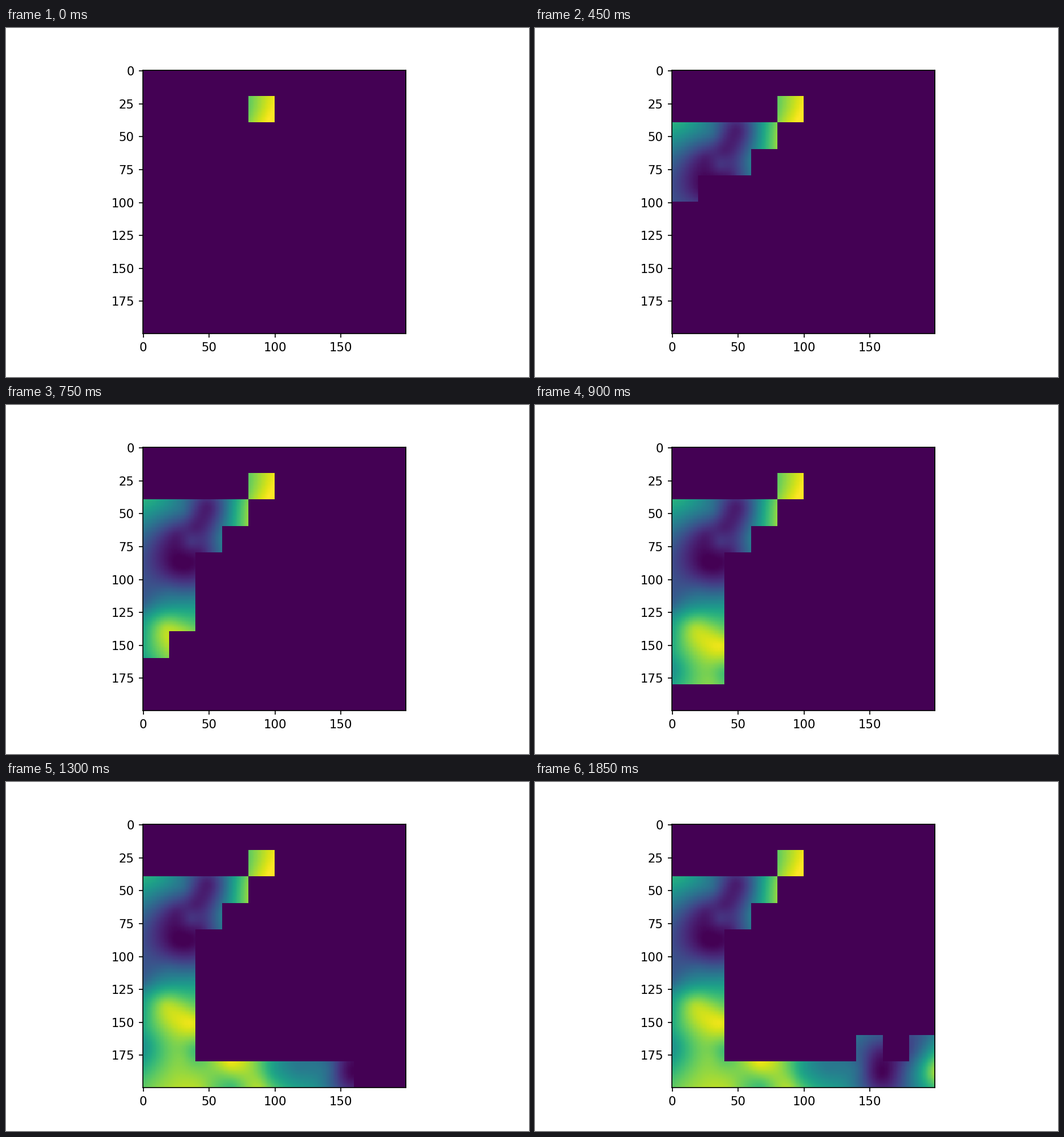
These frames come from a looping animation (917 by 611 pixels, 2 s). A matplotlib script:

```python
import numpy as np
import matplotlib.pyplot as plt
from matplotlib.animation import FuncAnimation

W, H, DPI = 917, 611, 128
SCALE = 152.8 / DPI
SIZE, TILE = 200, 20
FRAMES, INTERVAL = 40, 50

plt.rcParams.update({
    "font.family": "DejaVu Sans",
    "font.size": 10 * SCALE,
    "axes.linewidth": 0.8 * SCALE,
})

# Key points of the landscape, grouped by height.
LEVELS = {
    0.01: [(25, 91), (38, 89), (159, 190)],
    0.08: [(49, 45), (40, 61), (25, 67), (43, 79), (157, 174)],
    0.15: [(37, 72), (24, 101), (40, 101), (172, 186), (149, 190)],
    0.25: [(0, 80), (0, 100), (59, 46), (183, 172), (159, 162)],
    0.33: [(10, 60), (31, 49), (20, 110), (0, 120), (142, 165), (141, 186)],
    0.42: [(60, 70), (27, 42), (117, 186), (129, 188), (198, 162), (183, 190)],
    0.50: [(20, 120), (40, 119), (0, 129), (0, 169), (67, 46), (110, 190),
           (130, 199)],
    0.59: [(0, 143), (0, 156), (8, 42), (99, 189)],
    0.70: [(0, 193), (10, 182), (30, 130), (40, 172), (68, 199), (199, 199)],
    0.80: [(79, 44), (78, 58), (84, 22), (30, 177), (59, 190), (40, 140)],
    0.87: [(17, 137), (22, 156), (43, 199), (88, 199), (200, 189), (88, 30)],
    0.97: [(37, 151), (66, 181), (92, 39), (99, 21)],
}


def kernel(a, b):
    d2 = ((a[:, None] - b) ** 2).sum(axis=2)
    return d2 * np.log(d2 + 1e-12)


def with_plane(p):
    return np.column_stack([np.ones(len(p)), p])


def terrain(levels):
    """Thin-plate surface through the key points."""
    pts = np.array([p for group in levels.values() for p in group]) / SIZE
    z = [h for h, group in levels.items() for _ in group]
    plane = with_plane(pts)
    system = np.block([[kernel(pts, pts), plane],
                       [plane.T, np.zeros((3, 3))]])
    weights = np.linalg.solve(system, np.append(z, np.zeros(3)))
    y, x = (np.mgrid[:SIZE, :SIZE] + 0.5) / SIZE
    grid = np.column_stack([x.ravel(), y.ravel()])
    surface = np.hstack([kernel(grid, pts), with_plane(grid)]) @ weights
    return np.clip(surface, 0, 1).reshape(SIZE, SIZE)


height = terrain(LEVELS)

# One (column, row) tile per step; revisited tiles change nothing.
walk = [(4, 1), (3, 2), (2, 2), (2, 3), (1, 3), (0, 2), (0, 3), (1, 2), (1, 3)]
walk += [(c, r) for r in range(4, 9) for c in (0, 1)]
walk += [(c, 9) for c in range(10)]
walk += [(9, 8)] + [(8, 9)] * 7 + [(7, 8)]


def explored(step):
    seen = np.zeros_like(height)
    for c, r in walk[:step + 1]:
        area = np.s_[r * TILE:(r + 1) * TILE, c * TILE:(c + 1) * TILE]
        seen[area] = height[area]
    return seen


fig = plt.figure(figsize=(W / DPI, H / DPI), dpi=DPI, facecolor="white")
left, top, side = 239.7, 73.7, 461.3
ax = fig.add_axes([left / W, 1 - (top + side) / H, side / W, side / H])
image = ax.imshow(explored(0), cmap="viridis", vmin=0, vmax=1,
                  interpolation="nearest")
ax.set_xticks(range(0, SIZE, 50))
ax.set_yticks(range(0, SIZE, 25))
ax.tick_params(length=3.5 * SCALE, width=0.8 * SCALE, pad=3.5 * SCALE)


def draw(step):
    image.set_data(explored(step))
    return [image]


anim = FuncAnimation(fig, draw, frames=FRAMES, interval=INTERVAL,
                     init_func=lambda: draw(0), repeat=True, repeat_delay=0)
plt.show()
```
